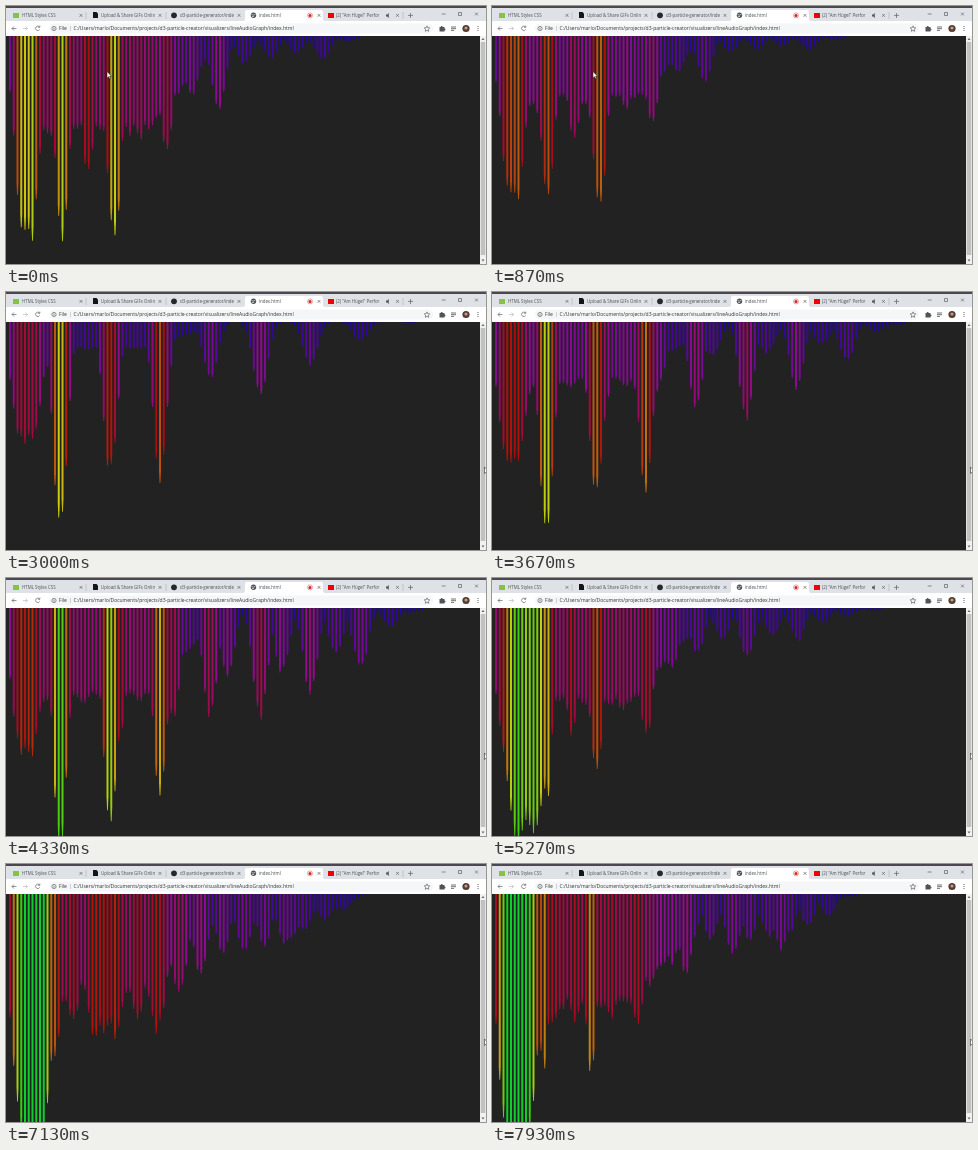
An HTML page with a canvas for the animation above (8000 ms loop, 480 px wide and 258 px high).

```html
<!DOCTYPE html>
<html lang="en">
<head>
<meta charset="utf-8">
<title>Line audio graph</title>
<style>
  html, body { margin: 0; width: 100%; height: 100%; overflow: hidden; background: #222; }
  canvas, svg { position: absolute; left: 0; top: 0; width: 480px; height: 258px; }
  text { font-family: "Open Sans", "Noto Sans", sans-serif; font-size: 4.4px; fill: #4b4e52; }
  .url { font-size: 5px; fill: #333; }
  .line { fill: none; stroke: #5f6368; stroke-width: .7; }
</style>
</head>
<body>
<canvas id="graph" width="480" height="258"></canvas>
<svg viewBox="0 0 480 258">
  <defs>
    <path id="close" class="line" d="M-1.4-1.4 1.4 1.4M1.4-1.4-1.4 1.4"/>
  </defs>
  <path fill="#dee1e6" d="M0 0H480V16H0z"/>
  <path fill="#4c4852" d="M0 0H480V2H0z"/>
  <path fill="#fff" d="M0 15H480V30H0zM237 15q2 0 2-2V6q0-2 2-2H315q2 0 2 2V13q0 2 2 2z"/>
  <rect x="43" y="17.500" width="384" height="10" rx="5" fill="#f5f6f7"/>
  <path stroke="#a4a7ac" stroke-width=".5" d="M80 6V13M160 6V13M397 6V13"/>

  <rect x="7" y="7" width="6" height="5" fill="#83c441"/>
  <text x="16" y="11">HTML Styles CSS</text>
  <path fill="#151515" d="M87 6H90.500L92 7.500V12H87z"/>
  <text x="95" y="11">Upload &amp; Share GIFs Onlin</text>
  <circle cx="168" cy="9.300" r="2.900" fill="#24292e"/>
  <text x="174" y="11">d3-particle-generator/inde</text>
  <circle cx="247.500" cy="9.300" r="2.700" fill="#50545a"/>
  <path fill="none" stroke="#fff" stroke-width=".6" d="M245.500 8.500q2 1.500 4-.4M246 10.500h2"/>
  <text x="253" y="11">index.html</text>
  <circle cx="304" cy="9.400" r="2.500" fill="none" stroke="#e06060" stroke-width=".6"/>
  <circle cx="304" cy="9.400" r="1.500" fill="#d52222"/>
  <rect x="322" y="7" width="6" height="5" fill="#f00000"/>
  <text x="330" y="11">(2) "Am Hügel" Perfor</text>
  <path fill="#55585d" d="M380 8.500h1.200l1.600-1.500v5l-1.600-1.500H380z"/>
  <use href="#close" x="75" y="9.400"/><use href="#close" x="154" y="9.400"/>
  <use href="#close" x="233" y="9.400"/><use href="#close" x="313" y="9.400"/>
  <use href="#close" x="391.500" y="9.400"/><use href="#close" x="470.500" y="8"/>
  <path class="line" d="M402 9.400h5M404.500 7v5M435.700 8h4M452.500 6.500h3v3h-3z"/>

  <path class="line" d="M10.500 22.500H6m2-2-2 2 2 2M33.500 21a2.200 2.200 0 1 0 .2 2.400M33.800 19.600V21.300H32.100"/>
  <path class="line" style="stroke:#bbb" d="M17 22.500h4.500m-2-2 2 2-2 2"/>
  <circle class="line" cx="48" cy="22.500" r="2.100"/>
  <path class="line" d="M48 22v1.700M48 21v.5"/>
  <text class="url" x="53" y="24.200">File</text>
  <path stroke="#aaa" stroke-width=".5" d="M64.500 20V25"/>
  <text class="url" x="67.500" y="24.200">C:/Users/marlo/Documents/projects/d3-particle-creator/visualizers/lineAudioGraph/index.html</text>
  <path class="line" d="M421 19.900l.8 1.800 2 .2-1.500 1.400.4 2-1.700-1-1.700 1 .4-2-1.500-1.400 2-.2z"/>
  <path fill="#50545a" d="M433.500 21h1.200a1 1 0 0 1 2 0H438.500v1.500a1 1 0 0 1 0 2V25.500h-5z"/>
  <path stroke="#5f6368" stroke-width=".9" d="M445 21h5M445 22.700h5M445 24.400h3"/>
  <circle cx="460" cy="22.500" r="3.600" fill="#523c34"/>
  <circle cx="460" cy="22" r="1.600" fill="#c89b84"/>
  <path stroke="#5f6368" stroke-width="1" d="M472 20v1M472 22v1M472 24v1"/>

  <path fill="#f1f1f1" d="M474 30H480V258H474z"/>
  <path fill="#c1c1c1" d="M474.700 36H479.300V249H474.700z"/>
  <path fill="#666" d="M475.500 34l1.500-2 1.500 2zM475.500 253.500l1.500 2 1.500-2z"/>
  <path id="cursor" fill="#fff" stroke="#111" stroke-width=".5" d="M0 0V6.500L1.500 5.200 2.500 7.300 3.500 6.800 2.600 4.800H4.600z"/>
</svg>
<script>
const LOOP = 8000, STEP = 1000 / 15, TOP = 30, BARS = 125;
const CREST_SPACING = 13.5, PEAK_WIDTH = 2.7;

// Each chord: a bass hump, an even body under the middle range, and voices [pitch, gain]
// with a peak at every multiple of the pitch, as tall as the crest curve there.
const chords = [
  { at: 4, bass: { bar: 4.5, height: 200, width: 3.5 }, body: 95,
    voices: [[13.9, 1], [6.95, .65]], crest: [230, 200, 212, 118, 78, 20, 30, 0] },
  { at: 26, bass: { bar: 4, height: 112, width: 3.4 }, body: 6,
    voices: [[13.75, 1], [6.9, .5]], crest: [90, 105, 120, 38, 0, 0, 0, 0] },
  { at: 45, bass: { bar: 4.5, height: 118, width: 4.5 }, body: 26,
    voices: [[13.35, 1]], crest: [150, 201, 150, 152, 52, 75, 42, 17] },
  { at: 65, bass: { bar: 4.5, height: 148, width: 4.3 }, body: 90,
    voices: [[13.35, 1], [14.5, .65]], crest: [200, 235, 222, 188, 105, 110, 82, 60] },
  { at: 79, bass: { bar: 8, height: 225, width: 7 }, body: 95,
    voices: [[13.4, 1], [6.7, .7]], crest: [200, 190, 165, 132, 42, 49, 32, 7] },
  { at: 95, bass: { bar: 5.5, height: 275, width: 5.4 }, body: 85,
    voices: [[5.65, 1]], crest: [200, 150, 170, 155, 72, 62, 36, 0] },
  { at: 119, bass: { bar: 5.7, height: 275, width: 5.7 }, body: 112,
    voices: [[12.65, 1], [5.2, .75]], crest: [200, 170, 172, 128, 60, 62, 50, 0] }
];

const graph = document.getElementById('graph').getContext('2d');
const cursor = document.getElementById('cursor');
const clamp = v => Math.max(0, Math.min(1, v));
const mix = (a, b, u) => a + (b - a) * u;
const noise = n => { const s = Math.sin(n * 127.1) * 43758.5; return 2 * (s - Math.floor(s)) - 1; };

function crestAt(crest, bar) {
  const place = bar / CREST_SPACING, i = Math.floor(place);
  return mix(crest[i] || 0, crest[i + 1] || 0, place - i);
}

function barLength({ at, bass, body, voices, crest }, bar) {
  const hump = bass.height / (1 + ((bar - bass.bar) / bass.width) ** 4);
  const middle = bar < bass.bar ? 0 : body * clamp((58 - bar) / 22);
  const peaks = voices.map(([pitch, gain]) => {
    const center = Math.max(1, Math.round(bar / pitch)) * pitch;
    return gain * crestAt(crest, center) * Math.exp(-(((bar - center) / PEAK_WIDTH) ** 2));
  });
  return Math.max(hump, middle, ...peaks) * (1 + .06 * noise(bar + at));
}

for (const chord of chords)
  chord.lengths = Array.from({ length: BARS }, (_, bar) => barLength(chord, bar));

function drawBar(x, length) {
  if (length < 1) return;
  const hue = Math.min(245 + .7 * length + .001 * length * length, 490);
  const light = mix(31, 43, clamp((length - 90) / 110));
  const shoulder = TOP + Math.min(length * .93, length - 1), tip = TOP + length;
  graph.fillStyle = `hsl(${hue % 360}, 88%, ${light}%)`;
  graph.beginPath();
  graph.moveTo(x - 1, TOP);
  graph.lineTo(x + 1, TOP);
  graph.lineTo(x + 1, shoulder);
  graph.lineTo(x + .4, tip);
  graph.lineTo(x - .4, tip);
  graph.lineTo(x - 1, shoulder);
  graph.fill();
}

function render(time) {
  const step = Math.floor((time + 4) / STEP);
  const next = chords.findIndex((chord, i) => i > 0 && chord.at > step);
  const k = next < 0 ? chords.length - 2 : next - 1;
  const from = chords[k], to = chords[k + 1];
  const u = clamp((step - from.at) / (to.at - from.at));
  const swing = .07 * Math.sin(Math.PI * u);

  graph.fillStyle = '#222';
  graph.fillRect(0, 0, 480, 258);
  for (let i = 0; i < BARS; i++) {
    const length = mix(from.lengths[i], to.lengths[i], u);
    drawBar(4 + 3.75 * i, length * (1 + swing * Math.sin(step * .8 + i * .4)));
  }

  const slide = clamp((step - 17) / 7), lift = clamp((step - 30) / 10);
  const move = slide * slide * (3 - 2 * slide);
  cursor.setAttribute('transform', `translate(${mix(101, 478.5, move)} ${mix(65.5, 188, move) - 13 * lift})`);
}

const start = performance.now();
function tick() {
  render((performance.now() - start) % LOOP);
  requestAnimationFrame(tick);
}
tick();
</script>
</body>
</html>
```
